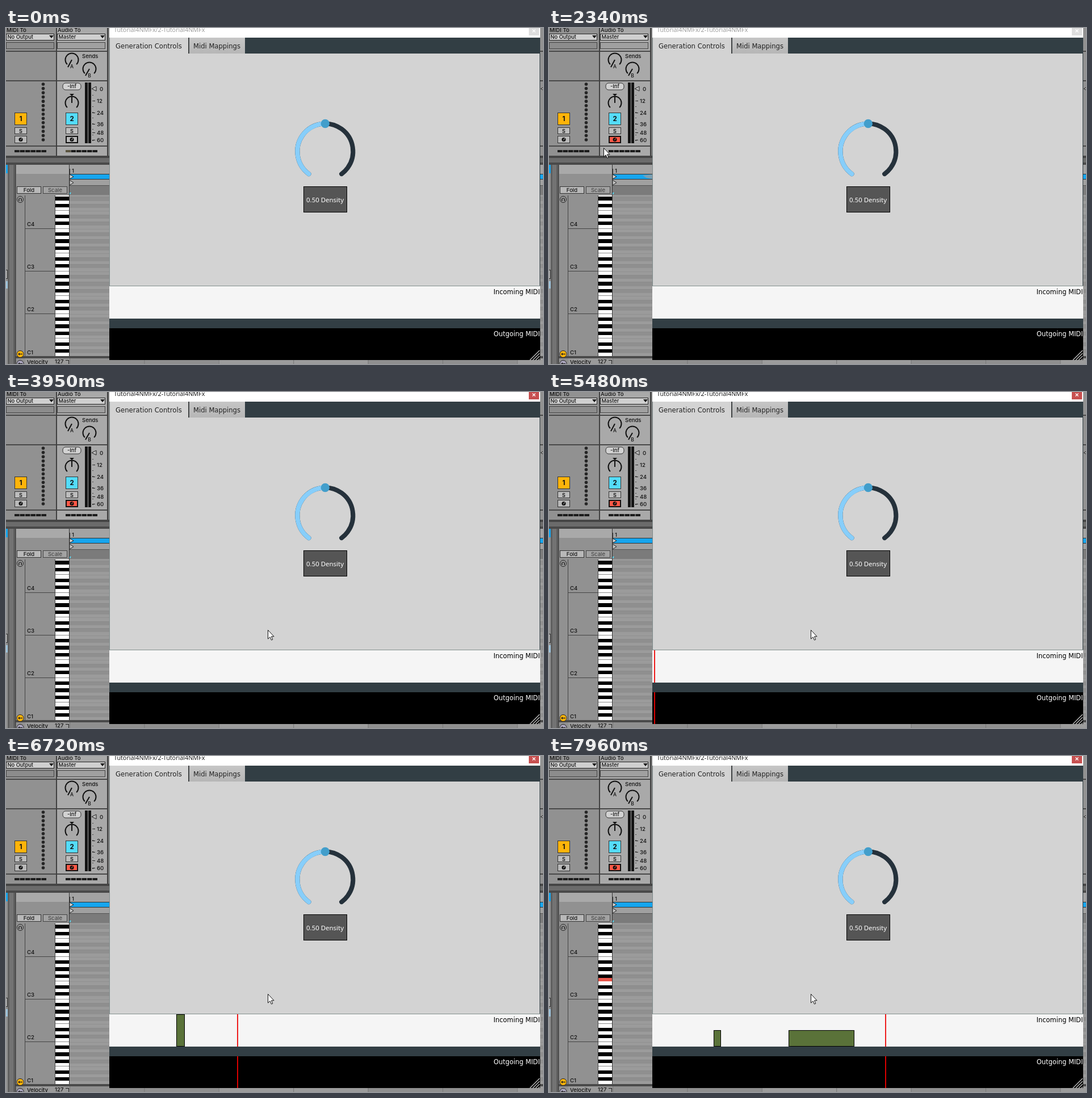
These frames come from a looping animation (946 px wide and 592 px high, 8 s). An HTML page with a canvas:

```html
<!DOCTYPE html>
<html lang="en">
<head>
<meta charset="utf-8">
<title>Density control</title>
<style>
  html, body { margin: 0; width: 100%; height: 100%; overflow: hidden; }
  canvas { display: block; width: 946px; height: 592px; }
</style>
</head>
<body>
<canvas id="stage" width="946" height="592"></canvas>
<script>
const LOOP = 8000;
const ctx = document.getElementById('stage').getContext('2d');
const LIVE = 'Inter, sans-serif';
const UI = '"DejaVu Sans", sans-serif';

// [time, x, y] of the pointer tip
const POINTER = [
  [270, 782, 560], [408, 620, 470], [546, 420, 350], [684, 265, 270],
  [822, 170, 225], [1029, 129, 209], [1098, 129, 209], [1380, 111, 198],
  [1450, 111, 198], [1580, 111, 196], [1788, 111, 196], [1926, 129, 176],
  [2064, 126, 204], [2202, 108, 219], [2340, 96, 211], [2547, 95, 205],
  [2685, 93, 190], [2823, 110, 173], [2961, 143, 196], [3168, 136, 245],
  [3375, 110, 311], [3444, 70, 320], [3513, 36, 350], [3582, 130, 405],
  [3651, 330, 432], [3718, 461, 419]
];
// [step, x] of the play line
const PLAY = [[0, 186], [18, 408], [30, 553], [33, 590], [34, 569], [36, 593]];

function at(table, t, col = 1) {
  if (t <= table[0][0]) return table[0][col];
  const i = table.findIndex(row => row[0] >= t);
  if (i < 0) return table[table.length - 1][col];
  const a = table[i - 1], b = table[i];
  return a[col] + (b[col] - a[col]) * (t - a[0]) / (b[0] - a[0]);
}

function rect(x, y, w, h, fill) {
  ctx.fillStyle = fill;
  ctx.fillRect(x, y, w, h);
}
function box(x, y, w, h, fill, edge = '#222', width = 1) {
  rect(x, y, w, h, fill);
  ctx.strokeStyle = edge;
  ctx.lineWidth = width;
  ctx.strokeRect(x + width / 2, y + width / 2, w - width, h - width);
}
function text(s, x, y, size, color = '#111', font = LIVE, align = 'left', weight = 500) {
  ctx.font = `${weight} ${size}px ${font}`;
  ctx.textAlign = align;
  ctx.fillStyle = color;
  ctx.fillText(s, x, y);
}
function poly(points, fill, edge, width = 1) {
  ctx.beginPath();
  points.forEach(([x, y], i) => i ? ctx.lineTo(x, y) : ctx.moveTo(x, y));
  ctx.closePath();
  if (fill) { ctx.fillStyle = fill; ctx.fill(); }
  if (edge) { ctx.strokeStyle = edge; ctx.lineWidth = width; ctx.stroke(); }
}
function line(x1, y1, x2, y2, color, width = 1) {
  ctx.beginPath();
  ctx.moveTo(x1, y1);
  ctx.lineTo(x2, y2);
  ctx.strokeStyle = color;
  ctx.lineWidth = width;
  ctx.stroke();
}
function arc(x, y, r, from, to, color, width) {
  ctx.beginPath();
  ctx.arc(x, y, r, from, to);
  ctx.strokeStyle = color;
  ctx.lineWidth = width;
  ctx.stroke();
}
function disc(x, y, r, fill, edge) {
  ctx.beginPath();
  ctx.arc(x, y, r, 0, Math.PI * 2);
  if (fill) { ctx.fillStyle = fill; ctx.fill(); }
  if (edge) { ctx.strokeStyle = edge; ctx.lineWidth = 1; ctx.stroke(); }
}

function dial(x, y, px, py) {
  arc(x, y, 11.5, Math.PI * .75, Math.PI * 2.25, '#111', 2);
  line(x, y, px, py, '#111', 2);
}

function route(x, title, value) {
  text(title, x + 1, 6.5, 9.6);
  box(x, 10, 85, 12, '#cfcfcf');
  text(value, x + 2.5, 19, 9.3);
  poly([[x + 76, 13], [x + 84, 13], [x + 80, 18]], '#111');
  box(x, 25, 85, 12, x ? '#a0a0a0' : '#8c8c8c', '#444');
}

function strip(x, number, color, armed, selected) {
  box(x, 149, 22, 22, color, '#333');
  text(number, x + 11, 164, 11.5, '#111', LIVE, 'center', 700);
  box(x, 175, 22, 12, '#bdbdbd', '#333');
  text('S', x + 11, 184.5, 9, '#111', LIVE, 'center', 600);
  box(x, 190, 22, 13, armed ? '#ff5846' : '#b9b9b9', selected ? '#111' : '#333', selected ? 2 : 1);
  disc(x + 11, 196.5, 3.5, '#111');
  line(x + 10.5, 198, x + 12.5, 194, armed ? '#ff5846' : '#bbb');
  for (let i = 0; i < 6; i++) rect(x + i * 9.5, 215, 8.5, 4, '#1c1c1c');
}

function mixer(t) {
  rect(0, 0, 946, 226, '#919191');
  rect(90, 0, 88, 226, '#a9a9a9');
  for (const y of [40, 92, 207]) rect(0, y, 946, 2, '#484848');
  rect(88, 0, 2, 226, '#404040');
  rect(178, 0, 2, 226, '#404040');
  rect(180, 0, 2, 226, '#7a7a7a');
  route(0, 'MIDI To', 'No Output');
  route(90, 'Audio To', 'Master');

  text('Sends', 134, 53, 9.5);
  dial(116, 56, 109, 69);
  dial(147, 72, 140, 84);
  text('A', 116, 71, 8.5, '#111', LIVE, 'center');
  text('B', 147, 87, 8.5, '#111', LIVE, 'center');
  ctx.beginPath();
  ctx.roundRect(100, 97, 32, 12, 5);
  ctx.fillStyle = '#d2d2d2';
  ctx.fill();
  ctx.strokeStyle = '#333';
  ctx.lineWidth = 1;
  ctx.stroke();
  text('-Inf', 116, 106, 9.3, '#111', LIVE, 'center');
  poly([[112, 116], [120, 116], [116, 120]], '#111');
  dial(116, 132, 116, 120);

  rect(139, 96, 5, 107, '#151515');
  rect(145, 96, 5, 107, '#151515');
  for (const x of [159, 950]) poly([[x - 8, 107], [x, 103], [x, 111]], '#bbb', '#222');
  [107, 128, 149, 169, 184, 197].forEach((y, i) => {
    if (i) rect(152, y, 5, 1, '#222');
    text(String(i * 12), i ? 160 : 165, y + 3.5, 9.6);
  });
  for (let y = 118; y < 200; y += 10) rect(152, y, 2, 1, '#444');
  for (let i = 0; i < 14; i++) disc(65.5, 99 + i * 7.54, 2.8, '#252525');

  strip(15, '1', '#ffb40a', false, false);
  strip(105, '2', '#54dcfa', t >= 1800, true);
  if (t < 70) rect(105, 215, 8.5, 4, '#5b543f');

  rect(0, 225, 946, 16, '#6b6b6b');
  rect(0, 225, 946, 4, '#454545');
  rect(0, 237, 946, 4, '#494949');
}

function pianoRoll(litRow) {
  rect(0, 241, 946, 351, '#919191');
  rect(0, 241, 3, 15, '#14a5ee');
  box(-1, 426, 4, 16, '#a8a8a8', '#333');
  rect(0, 446, 3, 13, '#9fc4dc');
  rect(3, 241, 14, 351, '#5f5f5f');
  rect(6, 241, 7, 351, '#737373');
  rect(16, 241, 1.5, 351, '#3e3e3e');
  rect(18, 241, 93, 16, '#a9a9a9');

  rect(111, 241, 835, 16, '#a3a3a3');
  rect(112, 257, 834, 10, '#333');
  rect(112, 258, 834, 8, '#16a5ee');
  rect(112, 267, 834, 11, '#a0a0a0');
  rect(112, 278, 834, 16, '#7b7b7b');
  rect(112, 277, 834, 1, '#555');
  rect(112, 248, 1, 9, '#333');
  text('1', 116, 255, 9.5);
  poly([[112, 258], [119, 262], [112, 266]], '#d5d5d5', '#222');
  poly([[112, 268], [119, 272.5], [112, 277]], '#c4c4c4', '#222');
  poly([[112, 290], [115, 290], [112, 294]], '#54dcfa');

  box(19, 279, 43, 13, '#b8b8b8', '#333');
  box(65, 279, 43, 13, '#a2a2a2', '#444');
  text('Fold', 40.5, 289, 9.5, '#111', LIVE, 'center');
  text('Scale', 86.5, 289, 9.5, '#4a4a4a', LIVE, 'center');

  ctx.save();
  ctx.beginPath();
  ctx.rect(0, 295, 946, 283);
  ctx.clip();
  rect(87, 295, 24, 283, '#fff');
  const edge = n => Math.round(578.5 - n * 6.25);
  for (let n = 0; n < 47; n++) {
    const y = edge(n + 1), h = edge(n) - y, key = n % 12;
    const black = [1, 3, 6, 8, 10].includes(key);
    rect(112, y, 834, h, black ? '#8f8f8f' : '#9b9b9b');
    rect(112, y, 834, .6, '#898989');
    if (black) rect(87, y, 24, h, '#000');
    if (key === 0 || key === 5) rect(87, y + h - 1, 24, 1, '#8b8b8b');
    if (n === litRow) rect(87, y, 24, h, '#e8564b');
  }
  ctx.restore();
  rect(33, 295, 1, 283, '#444');
  rect(86, 295, 1, 283, '#444');
  rect(111, 241, 1, 351, '#333');
  for (let i = 0; i < 4; i++) {
    const y = 353 + i * 75;
    if (i < 3) rect(34, y, 53, 1, '#444');
    text('C' + (4 - i), 37, y - (i < 3 ? 4 : 3), 9.6);
  }
  disc(25, 302, 5.5, '#999', '#222');
  arc(25, 302.5, 2.5, Math.PI, 0, '#222', 1.2);
  rect(22, 302, 1.5, 3, '#222');
  rect(26.5, 302, 1.5, 3, '#222');

  rect(17, 578, 929, 4, '#4a4a4a');
  rect(34, 582, 912, 10, '#9a9a9a');
  for (let x = 112, i = 0; x < 946; x += 131.4, i++) {
    rect(x, 582, 131.4, 10, i % 4 < 2 ? '#8f8f8f' : '#9c9c9c');
    rect(x, 582, 1, 10, '#777');
  }
  text('Velocity', 37, 592, 9.6);
  text('127', 86, 590.5, 9.6);
  rect(105, 585, 6, 1, '#222');
  rect(110, 585, 1, 7, '#222');
  for (const [y, fill] of [[574.5, '#ffb40a'], [591.5, '#aaa5bd']]) {
    disc(25, y, 6, fill, '#222');
    line(22, y, 29, y, '#222', 1.4);
    poly([[21, y], [24, y - 2.5], [24, y + 2.5]], '#222');
  }
}

function pluginWindow(active) {
  rect(182, 0, 759, 585, '#323e44');
  rect(182, 0, 759, 17, '#fff');
  text('Tutorial4NMFx/2-Tutorial4NMFx', 190, 6.5, 10.8, active ? '#111' : '#999', '"Open Sans", sans-serif', 'left', 400);
  rect(921, 0, 18, 13, active ? '#c75050' : '#dedede');
  line(927.5, 2.5, 932.5, 7.5, '#fff', 1.3);
  line(932.5, 2.5, 927.5, 7.5, '#fff', 1.3);

  rect(183, 45, 757, 409, '#d3d3d3');
  rect(183, 17, 138, 28, '#d3d3d3');
  const shade = ctx.createLinearGradient(0, 17, 0, 45);
  shade.addColorStop(0, '#c6c6c6');
  shade.addColorStop(1, '#b6b6b6');
  rect(323, 17, 98, 28, shade);
  rect(321, 17, 1.5, 28, '#444');
  text('Generation Controls', 193, 36, 11.65, '#222', UI, 'left', 400);
  text('Midi Mappings', 330, 36, 11.55, '#222', UI, 'left', 400);

  const cx = 562.3, from = Math.PI * .7, to = Math.PI * 2.3;
  ctx.lineCap = 'round';
  arc(cx, 217.5, 49, from, to, '#25313b', 8);
  arc(cx, 217.5, 49, from, Math.PI * 1.5, '#87cefa', 8);
  ctx.lineCap = 'butt';
  disc(cx, 168.5, 7.7, '#429ecb');
  box(524, 279, 77, 46, '#555', '#000');
  text('0.50 Density', 562, 307, 11.45, '#fff', '"Noto Sans", sans-serif', 'center', 400);

  rect(182, 454, 759, 1, '#83918f');
  rect(182, 455, 759, 57, '#f5f5f5');
  rect(182, 529, 759, 56, '#000');
  rect(182, 17, 1, 438, '#7f8b8b');
}

function overlay(step) {
  if (step >= 0) {
    const scale = step >= 34 ? .912 : 1;
    const top = step >= 36 ? 483 : 455;
    const note = (a, b) => {
      const x = Math.round(182 + (a - 182) * scale);
      const end = Math.round(182 + (b - 182) * scale);
      box(x, top, end - x, 512 - top, '#5a7239', '#000');
    };
    if (step >= 11) note(300, 315);
    if (step >= 32) note(445, 572);
    const x = Math.round(at(PLAY, step));
    rect(x - 1, 455, 2, 57, '#ee1c1c');
    rect(x - 1, 529, 2, 56, '#dc0000');
  }
  text('Incoming MIDI', 940.5, 469, 11.45, '#000', UI, 'right', 400);
  text('Outgoing MIDI', 940.5, 543, 11.4, '#fff', UI, 'right', 400);
  for (let i = 0; i < 4; i++) {
    const d = 17 - i * 5;
    line(940 - d, 585, 940, 585 - d, '#c4c4c4', 1.3);
    line(941 - d, 585, 940, 586 - d, '#555', .8);
  }
}

function pointer(x, y) {
  const shape = [[0, 0], [0, 15.5], [3.6, 12.2], [6, 17.6], [8.3, 16.6], [6, 11.3], [10.6, 11.3]];
  poly(shape.map(([dx, dy]) => [x + .5 + dx, y + .5 + dy]), '#fff', '#111');
}

function draw(t) {
  const step = Math.floor((t - 5480) / 68.89 + .2);
  let lit = -1;
  if (step === 10 || (step >= 22 && step < 32)) lit = 24;
  if (step >= 34) lit = 29;
  mixer(t);
  pianoRoll(lit);
  if (t >= 900 && t < 3950) poly([[165, 260], [182, 258], [182, 266], [172, 264]], '#7d9fb0');
  pluginWindow(t >= 3950);
  overlay(step);
  const held = 2340 + Math.floor((t - 2340) / 69 + .05) * 69;
  if (t >= 270) pointer(Math.round(at(POINTER, held)), Math.round(at(POINTER, held, 2)));
}

const start = performance.now();
function tick() {
  draw((performance.now() - start) % LOOP);
  requestAnimationFrame(tick);
}
tick();
</script>
</body>
</html>
```
